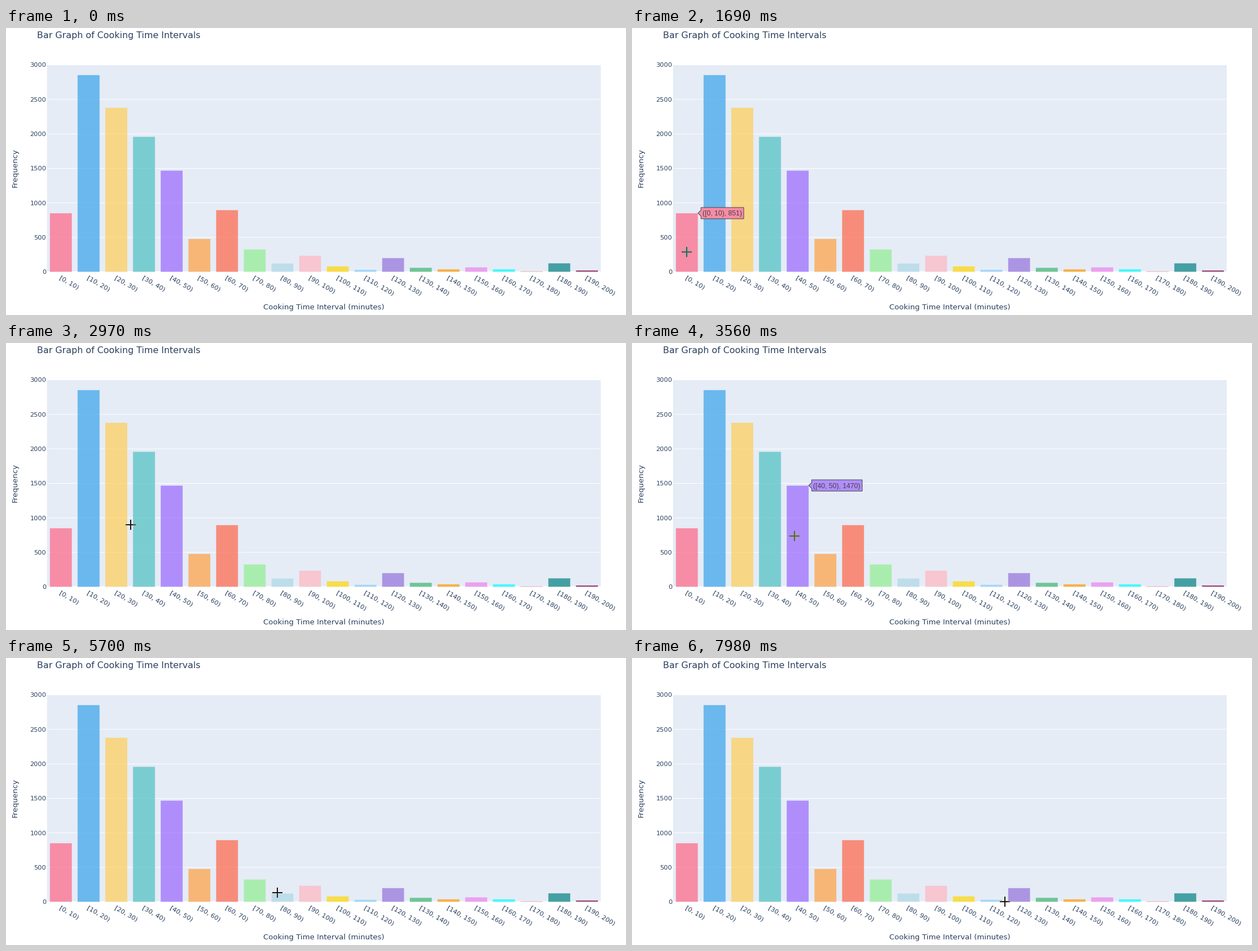
These frames come from a looping animation (1099 by 510 pixels, 8000 ms). A matplotlib script:

```python
import numpy as np
import matplotlib.pyplot as plt
from matplotlib.animation import FuncAnimation
from matplotlib.colors import to_rgb
from matplotlib.patches import Polygon, Rectangle
from matplotlib.path import Path

WIDTH, HEIGHT, DPI = 1099, 510, 64
LOOP_MS, STEP_MS = 8000, 20
PT = 72 / DPI  # points per pixel

LEFT, RIGHT, TOP, BASE = 72.8, 1054.3, 65.6, 433.3
INK, PLOT_BG, HOVER_INK = "#2a3f5f", "#e5ecf6", "#444444"
VALUES = [851, 2854, 2380, 1960, 1470, 478, 897, 327, 123, 236,
          82, 32, 200, 60, 38, 67, 38, 10, 125, 22]
COLORS = ["#ff6384", "#36a2eb", "#ffce56", "#4bc0c0", "#9966ff", "#ff9f40",
          "tomato", "lightgreen", "lightblue", "lightpink", "gold",
          "lightskyblue", "mediumpurple", "mediumseagreen", "#ff9900",
          "violet", "cyan", "salmon", "teal", "#800040"]
OPACITY = 0.7
SLOT = (RIGHT - LEFT) / len(VALUES)
BAR_WIDTH = 0.8 * SLOT
HOVER_SIZE = 12.28
ARM = 9

# Pointer strokes: begin ms, end ms, end x, end y, ease-out power, vertical bow
SWEEP_FROM, SWEEP = (977, 497), [(160, 370, 564, 506, 1, -28)]
VISIT_FROM, VISIT = (235, 506), [
    (830, 1620, 92, 404, 2, 25),
    (1650, 2370, 167, 331, 1.5, -10),
    (2470, 3270, 255, 334, 1, -10),
    (3300, 4110, 372, 393, 0.85, -10),
    (4460, 5260, 453, 402, 3.4, -12),
    (5280, 6110, 509, 424, 1, 4),
    (6280, 7050, 583, 428, 1.32, -2),
    (7150, 7480, 609, 431, 1, 0),
    (7690, 7980, 661, 433, 1, 0),
]

ARROW = np.array([(0, 0), (0, 16), (3.7, 12.5), (6.3, 18.5),
                  (8.7, 17.5), (6.1, 11.6), (11.3, 11.6)])
# One quarter of the cross, turned four times
CROSS = np.array([q for turn in (1, 1j, -1, -1j)
                  for q in (turn * (ARM - 1j), turn * (ARM + 1j), turn * (1 + 1j))])
CROSS = np.column_stack([CROSS.real, CROSS.imag])


def y_at(value):
    return BASE - value * (BASE - TOP) / 3000


def bar_left(i):
    return LEFT + (i + 0.5) * SLOT - BAR_WIDTH / 2


def blend(color):
    return OPACITY * np.array(to_rgb(color)) + (1 - OPACITY) * np.array(to_rgb(PLOT_BG))


def interval(i):
    return f"[{10 * i}, {10 * i + 10})"


def hover_width(text):
    ems = sum(0.556 if c.isdigit() else 0.333 if c in "()" else 0.278 for c in text)
    return ems * HOVER_SIZE


fig = plt.figure(figsize=(WIDTH / DPI, HEIGHT / DPI), dpi=DPI, facecolor="white")
ax = fig.add_axes([0, 0, 1, 1])
ax.set_xlim(0, WIDTH)
ax.set_ylim(HEIGHT, 0)
ax.axis("off")


def label(x, y, text, size, **kwargs):
    options = dict(family="DejaVu Sans", color=INK, va="baseline",
                   rotation_mode="anchor") | kwargs
    return ax.text(x, y, text, fontsize=size * PT, **options)


def box(x, y, w, h, color, **kwargs):
    return ax.add_patch(Rectangle((x, y), w, h, facecolor=color, snap=False, **kwargs))


# Static chart
box(LEFT, TOP, RIGHT - LEFT, BASE - TOP, PLOT_BG, lw=0)
for value in range(0, 3001, 500):
    y = y_at(value)
    ax.plot([LEFT, RIGHT], [y, y], color="white", solid_capstyle="butt",
            lw=(1 if value else 2) * PT, zorder=1, snap=False)
    label(71.3, y + 3.8, str(value), 11.34, ha="right")

inverted_bars = []
for i, (value, color) in enumerate(zip(VALUES, COLORS)):
    x, y = bar_left(i), y_at(value)
    box(x, y, BAR_WIDTH, BASE - y, (*to_rgb(color), OPACITY),
        edgecolor=PLOT_BG, lw=0.5 * PT, zorder=2)
    label(x + BAR_WIDTH / 2 - 3.5, 445.7, interval(i), 11.34, rotation=-30)
    inverted_bars.append(box(x, y, BAR_WIDTH, BASE - y, 1 - blend(color),
                             lw=0, zorder=8, visible=False))

label(55, 18, "Bar Graph of Cooking Time Intervals", 15.93)
label(563.5, 499.7, "Cooking Time Interval (minutes)", 13.2, ha="center")
label(20, 248.5, "Frequency", 13.2, ha="center", rotation=90)

# Moving parts
hover_box = ax.add_patch(Polygon([(0, 0), (1, 0), (1, 1)], edgecolor=HOVER_INK,
                                 lw=PT, zorder=5))
hover_text = label(0, 0, "", HOVER_SIZE, family="Liberation Sans",
                   color=HOVER_INK, zorder=6)
cross = ax.add_patch(Polygon(CROSS, facecolor=1 - np.array(to_rgb(PLOT_BG)),
                             lw=0, zorder=7, snap=False))
arrow = ax.add_patch(Polygon(ARROW, facecolor="white", edgecolor="black",
                             lw=PT, zorder=9))


def follow(t, pos, strokes):
    pos = np.array(pos, float)
    for begin, end, x, y, power, bow in strokes:
        u = np.clip((t - begin) / (end - begin), 0, 1)
        s = 1 - (1 - u) ** power
        pos = pos + s * (np.array([x, y]) - pos) + [0, bow * np.sin(np.pi * s)]
    return np.round(pos)


def pointer(t):
    if SWEEP[0][0] <= t < SWEEP[0][1]:
        return follow(t, SWEEP_FROM, SWEEP)
    if t >= VISIT[0][0]:
        return follow(t, VISIT_FROM, VISIT)
    return None


def hovered_bar(x, y):
    for i, value in enumerate(VALUES):
        left = bar_left(i)
        if left <= x <= left + BAR_WIDTH + 1 and y_at(value) <= y < BASE:
            return i
    return None


def show_hover(i):
    hover_box.set_visible(i is not None)
    hover_text.set_visible(i is not None)
    if i is None:
        return
    text = f"({interval(i)}, {VALUES[i]})"
    x, y = bar_left(i) + BAR_WIDTH, y_at(VALUES[i])
    x0 = x + 5.3
    x1 = x0 + hover_width(text) + 5.5
    hover_box.set_xy([(x, y), (x0, y - 5.3), (x0, y - 10), (x1, y - 10),
                      (x1, y + 10), (x0, y + 10), (x0, y + 5.3)])
    hover_box.set_facecolor(blend(COLORS[i]))
    hover_text.set_position((x0 + 2.8, y + 4.4))
    hover_text.set_text(text)


def show_cross(pos):
    """Draw the cross in the inverse of whatever lies under it."""
    cross.set_visible(pos is not None)
    for bar in inverted_bars:
        bar.set_visible(False)
    if pos is None:
        return
    outline = CROSS + pos
    cross.set_xy(outline)
    clip = Path(outline, closed=False)
    for bar in inverted_bars:
        if bar.get_x() - ARM < pos[0] < bar.get_x() + BAR_WIDTH + ARM:
            bar.set_clip_path(clip, ax.transData)
            bar.set_visible(True)


def update(frame):
    pos = pointer(frame * STEP_MS)
    inside = pos is not None and LEFT < pos[0] < RIGHT and TOP < pos[1] < BASE
    arrow.set_visible(pos is not None and not inside)
    if pos is not None:
        arrow.set_xy(ARROW + pos)
    show_cross(pos if inside else None)
    show_hover(hovered_bar(*pos) if inside else None)
    return [hover_box, hover_text, cross, *inverted_bars, arrow]


animation = FuncAnimation(fig, update, frames=LOOP_MS // STEP_MS, interval=STEP_MS,
                          init_func=lambda: update(0), repeat=True, repeat_delay=0)
plt.show()
```
